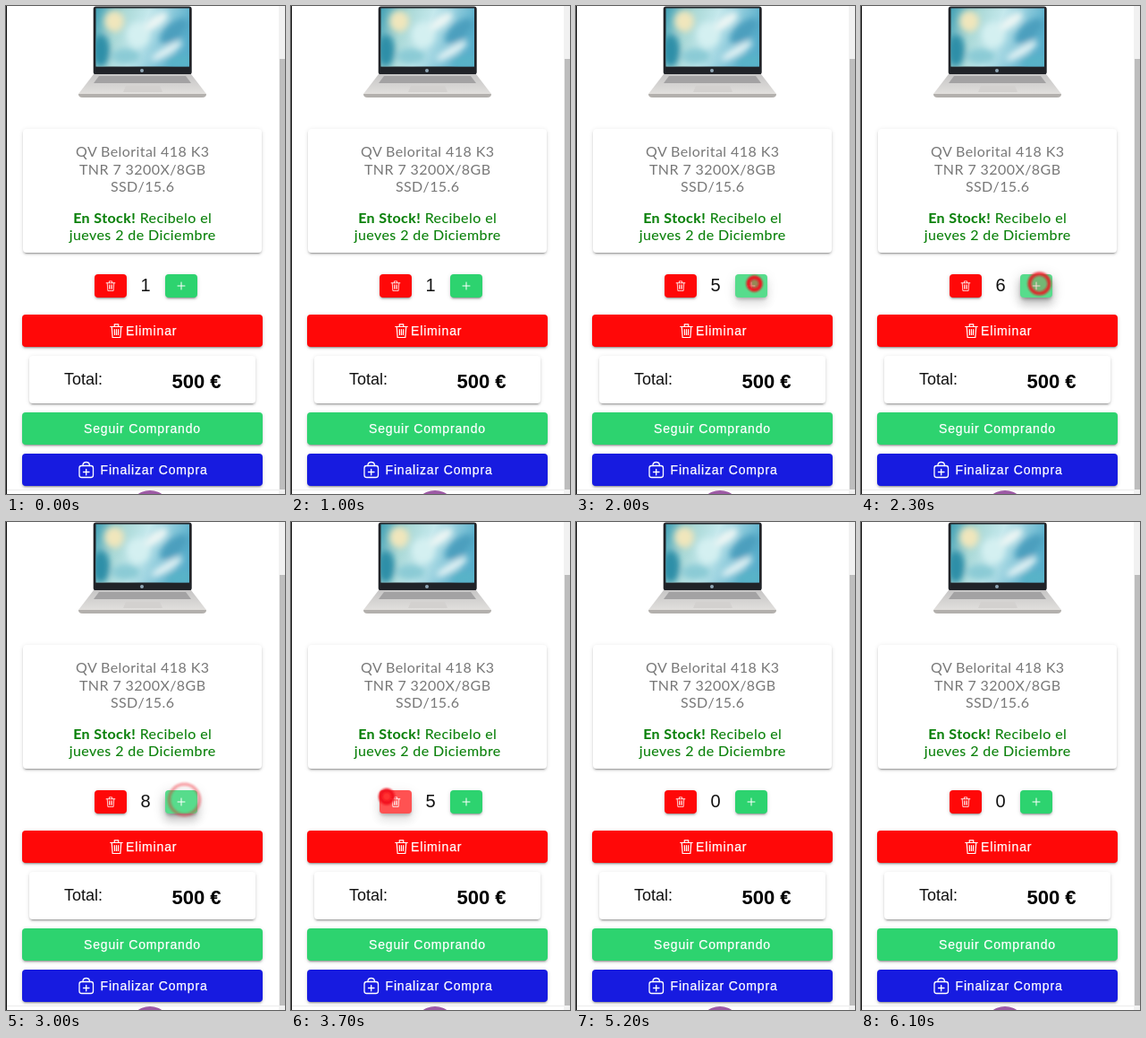
An HTML page that plays this animation: 312x544 px, repeating every 6200 ms.

```html
<!DOCTYPE html>
<html lang="es">
<head>
<meta charset="utf-8">
<title>Carrito</title>
<style>
html, body { margin: 0; width: 100%; height: 100%; overflow: hidden; background: #fff; }
#stage { position: relative; width: 312px; height: 544px; overflow: hidden; background: #fff; }
#stage > * { position: absolute; box-sizing: border-box; }
.box {
  border-radius: 4px;
  box-shadow: 0 3px 1px -2px rgba(0,0,0,.2), 0 2px 2px rgba(0,0,0,.14), 0 1px 5px rgba(0,0,0,.12);
}
.wide { left: 18px; width: 268.5px; height: 36px; }
.small { top: 299px; width: 36px; height: 25.5px; }
.red { background: #ff0808; }
.green { background: #2dd36f; }
.blue { background: #171be0; }
.hover {
  box-shadow:
    0 2px 3px rgba(0,0,0,.14),
    0 5px 5px -3px rgba(0,0,0,calc(.2 * var(--lift))),
    0 8px 10px 1px rgba(0,0,0,calc(.14 * var(--lift))),
    0 3px 14px 2px rgba(0,0,0,calc(.12 * var(--lift)));
}
.red.hover { background: #ff5252; }
.green.hover { background: #57dc8c; }
svg { left: 0; top: 0; }
text { font-family: "Liberation Sans", Arial, sans-serif; }
.info text { font: 16px Lato, sans-serif; letter-spacing: .42px; text-anchor: middle; }
.label text { font-size: 14px; letter-spacing: .84px; fill: #fff; stroke: #fff; stroke-width: .25px; }
.icon { fill: none; stroke: #fff; stroke-linecap: round; stroke-linejoin: round; }
</style>
</head>
<body>
<div id="stage">
  <div style="left:0;top:0;width:1px;height:544px;background:#111"></div>
  <div style="left:305px;top:0;width:7px;height:544px;background:#f1f1f1"></div>
  <div style="left:306px;top:59px;width:6px;height:480px;background:#bdbdbd"></div>

  <div class="box" style="left:19px;top:137px;width:267px;height:138px;background:#fff"></div>
  <div class="box small red" id="minus" style="left:99px"></div>
  <div class="box small green" id="plus" style="left:178px"></div>
  <div class="box wide red" style="top:344px"></div>
  <div class="box" style="left:26px;top:390px;width:253px;height:53px;background:#fff"></div>
  <div class="box wide green" style="top:453px"></div>
  <div class="box wide blue" style="top:499px"></div>

  <svg width="312" height="544" viewBox="0 0 312 544">
    <defs>
      <linearGradient id="sky" x2="1" y2=".25">
        <stop offset="0" stop-color="#3f9fb4"/>
        <stop offset=".3" stop-color="#a9d8d6"/>
        <stop offset=".55" stop-color="#c4e8ec"/>
        <stop offset="1" stop-color="#58aecb"/>
      </linearGradient>
      <linearGradient id="silver" x2="0" y2="1">
        <stop offset="0" stop-color="#c6c5c5"/>
        <stop offset="1" stop-color="#e6e4e1"/>
      </linearGradient>
      <filter id="soft" x="-50%" y="-50%" width="200%" height="200%"><feGaussianBlur stdDeviation="3.5"/></filter>
      <filter id="edge" x="-50%" y="-50%" width="200%" height="200%"><feGaussianBlur stdDeviation="1.2"/></filter>
      <clipPath id="screen"><path d="M100.500 2.500H205V67.500H100.500Z"/></clipPath>
      <symbol id="trash" viewBox="0 0 24 24">
        <path d="M3 6H21M5 6l1.2 16h11.6L19 6M9 6V2.5h6V6M12 10v8M9 10l.4 8M15 10l-.4 8"/>
      </symbol>
    </defs>

    <g id="laptop">
      <rect x="97.700" y=".5" width="110" height="76" rx="3" fill="#202328"/>
      <g clip-path="url(#screen)">
        <path d="M100 1H206V68H100Z" fill="url(#sky)"/>
        <g filter="url(#soft)">
          <ellipse cx="121" cy="17" rx="11" ry="12" fill="#f0e6bc"/>
          <ellipse cx="106" cy="50" rx="10" ry="18" fill="#2f8fa8"/>
          <ellipse cx="134" cy="56" rx="16" ry="9" fill="#8bcbd5"/>
          <ellipse cx="148" cy="32" rx="13" ry="14" fill="#d4f0f1"/>
          <ellipse cx="188" cy="28" rx="19" ry="9" fill="#4c9fbe" transform="rotate(-40 188 28)"/>
          <ellipse cx="168" cy="17" rx="15" ry="6" fill="#edf6f4" transform="rotate(-35 168 17)"/>
          <ellipse cx="180" cy="50" rx="20" ry="5" fill="#e2f2f4" transform="rotate(-30 180 50)"/>
          <ellipse cx="195" cy="62" rx="16" ry="7" fill="#58b3c8"/>
        </g>
      </g>
      <circle cx="152" cy="72" r="2" fill="#8fa6b5"/>
      <path d="M98 76H207L224 98Q224 102 219 102H86Q81 102 81 98Z" fill="url(#silver)"/>
      <path d="M104 78H201L207 86H98Z" fill="#a3a2a3"/>
      <path d="M134 89H172L175 96H131Z" fill="#d3d1cf"/>
      <path d="M81 98H224Q224 102 219 102H86Q81 102 81 98Z" fill="#b3b0ad"/>
    </g>

    <g class="info" fill="#787878">
      <text x="152.7" y="168">QV Belorital 418 K3</text>
      <text x="152.7" y="188">TNR 7 3200X/8GB</text>
      <text x="152.7" y="207">SSD/15.6</text>
      <g fill="#0a800a" stroke="#0a800a" stroke-width=".1">
        <text x="152.7" y="242"><tspan font-weight="700">En Stock!</tspan> Recibelo el</text>
        <text x="152.7" y="261">jueves 2 de Diciembre</text>
      </g>
    </g>

    <text id="count" x="156" y="318" font-size="20" text-anchor="middle" fill="#111">1</text>
    <text x="65" y="422" font-size="18" fill="#111">Total:</text>
    <text x="185.5" y="426" font-size="22" font-weight="700">500 €</text>

    <g class="label">
      <text x="134" y="367">Eliminar</text>
      <text x="87" y="476">Seguir Comprando</text>
      <text x="105.5" y="522">Finalizar Compra</text>
    </g>

    <g class="icon">
      <use href="#trash" x="110.5" y="305.5" width="13" height="13" stroke-width="1.5"/>
      <use href="#trash" x="114.5" y="353" width="18" height="18" stroke-width="1.6"/>
      <path d="M192 312h8M196 308v8" stroke-width="1"/>
      <rect x="82" y="512.500" width="15.500" height="13" rx="2.500" stroke-width="1.3"/>
      <path d="M86 512.500v-.5q0-3.500 3.700-3.500t3.700 3.500v.5M86.500 519.500h6.500M89.700 516.300v6.500" stroke-width="1.3"/>
    </g>

    <path d="M1 539.500H305" stroke="#ececec"/>
    <circle cx="161" cy="564" r="24" fill="#9d5aa5"/>
    <circle id="ring" fill="#f00" stroke="#f2101a" filter="url(#edge)" visibility="hidden"/>
  </svg>
</div>
<script>
const LOOP = 6200, STEP = 100;
const $ = id => document.getElementById(id);
const ring = $('ring'), count = $('count');

const buttons = [
  { el: $('plus'), x: 199.5, y: 309.5, from: 1100, to: 3100,
    clicks: [1200, 1600, 1700, 1900, 2100, 2400, 2600] },
  { el: $('minus'), x: 107, y: 306, from: 3200, to: 4800,
    clicks: [3200, 3400, 3600, 3800, 3900, 4100, 4200, 4300, 4500] }
];

// Expanding click ring; age is counted in steps.
function drawRing(b, age) {
  const outer = 4.5 + 5 * age - .35 * age * age;
  const width = 4.5 - .2 * age;
  const attrs = {
    cx: b.x, cy: b.y, r: outer - width / 2, 'stroke-width': width,
    'fill-opacity': Math.max(0, .6 - .2 * age),
    opacity: 1 - .04 * age * age, visibility: 'visible'
  };
  for (const k in attrs) ring.setAttribute(k, attrs[k]);
}

function render(t) {
  ring.setAttribute('visibility', 'hidden');
  const [added, removed] = buttons.map(b => {
    const done = b.clicks.filter(c => c <= t);
    const hover = t >= b.from && t < b.to;
    const age = done.length ? (t - done[done.length - 1]) / STEP : 0;
    b.el.classList.toggle('hover', hover);
    b.el.style.setProperty('--lift', Math.min(1, age / 2));
    if (hover && done.length && age < 5) drawRing(b, age);
    return done.length;
  });
  count.textContent = Math.max(0, 1 + added - removed);
}

const start = performance.now();
function tick() {
  const t = (performance.now() - start) % LOOP;
  render(Math.floor(t / STEP) * STEP);
  requestAnimationFrame(tick);
}
tick();
</script>
</body>
</html>
```
